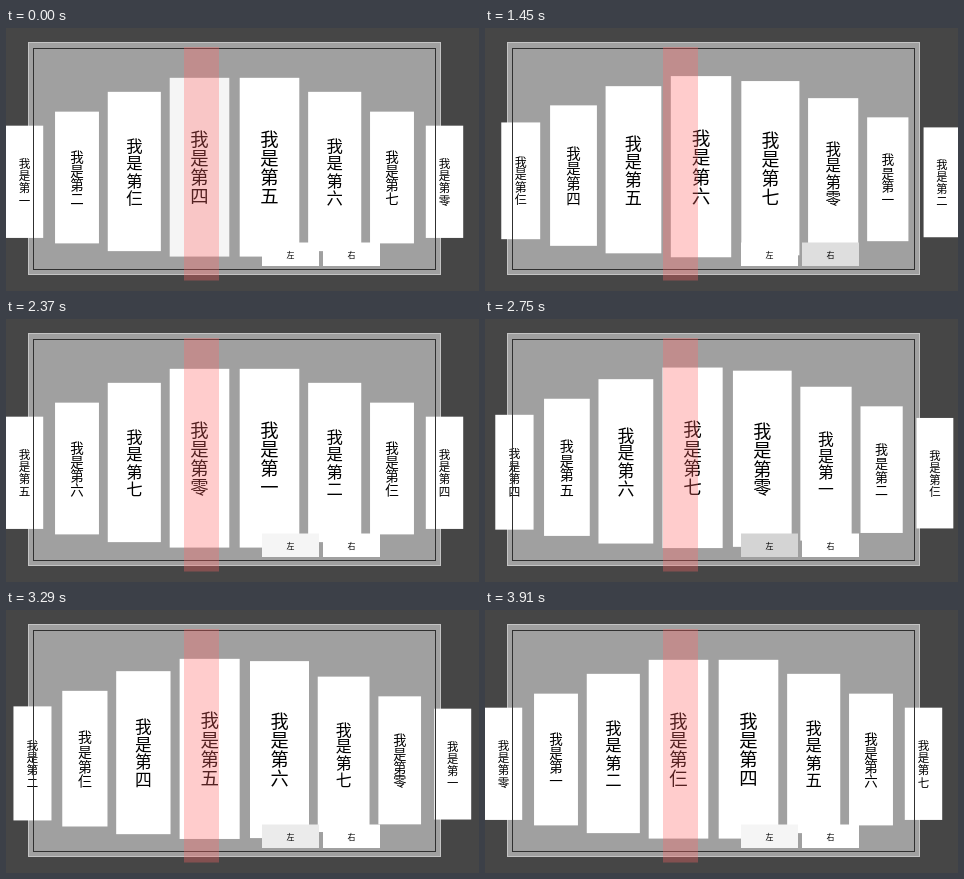
Recreate the animation shown at these times as an HTML page. Size 473x263 px, loop 4290 ms.

```html
<!DOCTYPE html>
<html lang="zh">
<head>
<meta charset="utf-8">
<style>
html, body { margin: 0; width: 100%; height: 100%; overflow: hidden; background: #464646; }
svg { display: block; width: 473px; height: 263px; }
text { font-family: "Noto Sans CJK SC", "Noto Sans CJK", sans-serif; text-anchor: middle; fill: #000; }
.card text { font-size: 18.5px; }
.button text { font-size: 8px; }
</style>
</head>
<body>
<svg viewBox="0 0 473 263">
  <rect width="473" height="263" fill="#464646"/>
  <rect x="22.5" y="14.5" width="412" height="232" fill="#a0a0a0" stroke="#c4c4c4"/>
  <g id="cards"></g>
  <rect x="27.5" y="20.5" width="402" height="221" fill="none" stroke="#303030"/>
  <g id="buttons"></g>
  <rect x="178" y="19" width="35" height="233.5" fill="#ff6464" fill-opacity=".33"/>
</svg>
<script>
const LOOP = 4290;
const SPEED = 3.6 / 1000; // slots per ms
const CENTER_X = 228.5;
const NUMERALS = "一二仨四五六七零";
// horizontal distance from the centre at every half slot
const REACH = [0, 35, 68.6, 100.2, 130, 157.5, 183.5, 210, 239];

const clamp = (v, a, b) => Math.min(b, Math.max(a, v));
const mix = (a, b, k) => a + (b - a) * k;
const gray = v => `rgb(${[v, v, v].map(Math.round)})`;

function add(parent, tag, attrs, text) {
  const el = document.createElementNS("http://www.w3.org/2000/svg", tag);
  for (const key in attrs) el.setAttribute(key, attrs[key]);
  if (text) el.textContent = text;
  return parent.appendChild(el);
}

function makeCard(numeral) {
  const g = add(document.getElementById("cards"), "g", { class: "card" });
  const face = add(g, "rect", { x: -30, y: -90, width: 60, height: 180, fill: "#fff" });
  [..."我是第" + numeral].forEach((ch, i) =>
    add(g, "text", { x: 0, y: (i - 1.5) * 19.4 + 7.4 }, ch));
  return { g, face };
}

function makeButton(x, label) {
  const g = add(document.getElementById("buttons"), "g", { class: "button" });
  const face = add(g, "rect", { x, y: 214.5, width: 57, height: 23.5, fill: "#fff" });
  add(g, "text", { x: x + 28.5, y: 229.5 }, label);
  return face;
}

const cards = [...NUMERALS].map(makeCard);
const left = makeButton(256, "左");
const right = makeButton(317, "右");

function reach(u) {
  const d = Math.abs(u) * 2;
  const i = Math.min(7, Math.floor(d));
  const k = d - i;
  const p0 = i ? REACH[i - 1] : -REACH[1];
  const p1 = REACH[i], p2 = REACH[i + 1];
  const p3 = i < 7 ? REACH[i + 2] : 2 * p2 - p1 + 3;
  const x = p1 + k / 2 * (p2 - p0 + k * (2 * p0 - 5 * p1 + 4 * p2 - p3
    + k * (3 * (p1 - p2) + p3 - p0)));
  return Math.sign(u) * x;
}

function shift(t) {
  return 5 * clamp((t - 2417) * SPEED / 5, 0, 1) - 4 * clamp((t - 985) * SPEED / 4, 0, 1);
}

// hovered shade, dipping with each click
function clickShade(t, start, period, count) {
  if (t < start) return 255;
  const n = Math.min(count - 1, Math.floor((t - start) / period));
  const s = t - start - n * period;
  const press = Math.min(clamp(s / 70, 0, 1), clamp((200 - s) / 100, 0, 1));
  return mix(245, 212, press);
}

function draw(t) {
  const offset = shift(t);
  cards.forEach(({ g }, i) => {
    const u = ((i + 0.5 + offset) % 8 + 8) % 8 - 4;
    const wave = Math.cos(u * Math.PI / 4);
    const x = CENTER_X + reach(u);
    const y = 146.5 - 7.9 * wave;
    const scale = (145.5 + 36 * wave) / 180;
    g.setAttribute("transform", `translate(${x.toFixed(2)} ${y.toFixed(2)}) scale(${scale.toFixed(4)})`);
  });
  cards[3].face.setAttribute("fill", gray(mix(245, 255, clamp((t - 870) / 100, 0, 1))));
  right.setAttribute("fill", gray(t < 2370 ? clickShade(t, 903, 250, 4) : 255));
  left.setAttribute("fill", gray(clickShade(t, 2370, 300, 5)));
}

const begin = performance.now();
function tick() {
  draw((performance.now() - begin) % LOOP);
  requestAnimationFrame(tick);
}
tick();
</script>
</body>
</html>
```
